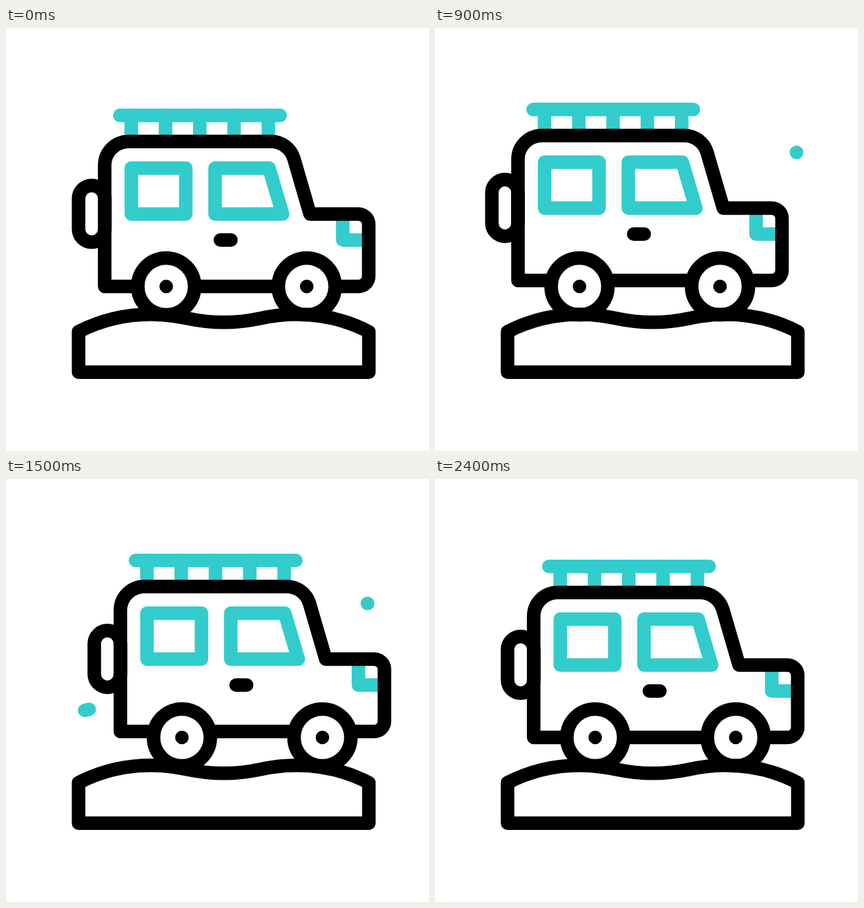
These frames come from a looping animation (640 by 640 pixels, 2.42 s). An HTML page:

```html
<!DOCTYPE html>
<html lang="en">
<head>
<meta charset="utf-8">
<title>Off-road car</title>
<style>
  html, body { margin: 0; width: 100%; height: 100%; overflow: hidden; background: #fff; }
  svg { display: block; width: 100%; height: 100%; }
  .line { fill: none; stroke: #000; stroke-width: 20.5; stroke-linecap: round; stroke-linejoin: round; }
  .teal { stroke: #33cccc; }
  .white { fill: #fff; }
</style>
</head>
<body>
<svg viewBox="0 0 640 640">
  <g id="body" class="line">
    <g class="teal">
      <path d="M172.2 132.2H414.8"/>
      <path d="M189.5 132V170M241.4 132V170M293.2 132V170M345.1 132V170M397 132V170"/>
      <path d="M509.5 285V320.8H546"/>
      <path d="M189.6 212H272V281.5H189.6Z"/>
      <path d="M316.3 212H398L418.5 281.5H316.3Z"/>
    </g>
    <rect x="109.8" y="238.3" width="39.6" height="85.8" rx="19.8"/>
    <path d="M149.3 391V207.7A36 36 0 0 1 185.3 171.7H401A36 36 0 0 1 435.4 197.1L460 281.5H533.3A15.5 15.5 0 0 1 548.8 297V375.5A15.5 15.5 0 0 1 533.3 391Z"/>
    <path d="M324.4 320.8H340.3"/>
  </g>
  <g id="wheels" class="line">
    <circle class="white" cx="242.4" cy="391" r="43"/>
    <circle class="white" cx="455" cy="391" r="43"/>
    <path d="M242.4 391h.01M455 391h.01"/>
  </g>
  <path class="line" d="M109.8 459.5C145 441.5 181 433.3 219 433.3C238 433.3 257 435.7 275 439.5C310 447 349 447 384 439.5C402 435.7 421 433.3 439.8 433.3C478 433.3 514 441.5 549 459.5V520.8H109.8Z"/>
  <path id="windLeft" class="line teal" d="M115.5 351C135 345.5 153 345 175 348.7C195 352 212 353.8 229.2 353.2"/>
  <path id="windRight" class="line teal" transform="translate(318 -165)" d="M115.5 351C135 345.5 153 345 175 348.7C195 352 212 353.8 229.2 353.2"/>
</svg>
<script>
  const LOOP = 2420, STEP = 20;
  const el = id => document.getElementById(id);
  const body = el('body'), wheels = el('wheels');

  // Each gust: head start, head duration, tail start, tail duration (ms)
  const winds = [
    { path: el('windLeft'), gusts: [[200, 620, 280, 620], [1075, 475, 1130, 455], [1678, 620, 1768, 620]] },
    { path: el('windRight'), gusts: [[15, 620, 80, 620], [885, 400, 962, 400], [1476, 620, 1556, 620]] }
  ];
  for (const w of winds) w.length = w.path.getTotalLength();

  const smooth = p => {
    p = Math.min(1, Math.max(0, p));
    return p * p * (3 - 2 * p);
  };

  // Eased value through evenly spaced keys
  function keyed(t, gap, keys) {
    const i = Math.min(keys.length - 2, Math.floor(t / gap));
    return keys[i] + (keys[i + 1] - keys[i]) * smooth(t / gap - i);
  }

  // The gusts run against the path, from its right end to its left end
  function drawWind({ path, gusts, length }, t) {
    const gust = gusts.find(([start, , tail, time]) => t >= start && t < tail + time);
    path.style.display = gust ? '' : 'none';
    if (!gust) return;
    const [start, time, tailStart, tailTime] = gust;
    const from = Math.min(0.999, 1 - smooth((t - start) / time));
    const to = 1 - smooth((t - tailStart) / tailTime);
    const dash = Math.max(0.01, (to - from) * length);
    path.setAttribute('stroke-dasharray', `${dash} ${length * 2}`);
    path.setAttribute('stroke-dashoffset', -from * length);
  }

  function draw(t) {
    const x = keyed(t, 800, [0, -26, 26, 0]);
    const y = keyed(t, 400, [0, 13, -13, 13, -13, 13, 0]);
    body.setAttribute('transform', `translate(${x} ${y})`);
    wheels.setAttribute('transform', `translate(${x} 0)`);
    for (const w of winds) drawWind(w, t);
  }

  const origin = performance.now();
  function tick() {
    const t = (performance.now() - origin) % LOOP;
    draw(Math.floor(t / STEP) * STEP);
    requestAnimationFrame(tick);
  }
  tick();
</script>
</body>
</html>
```
